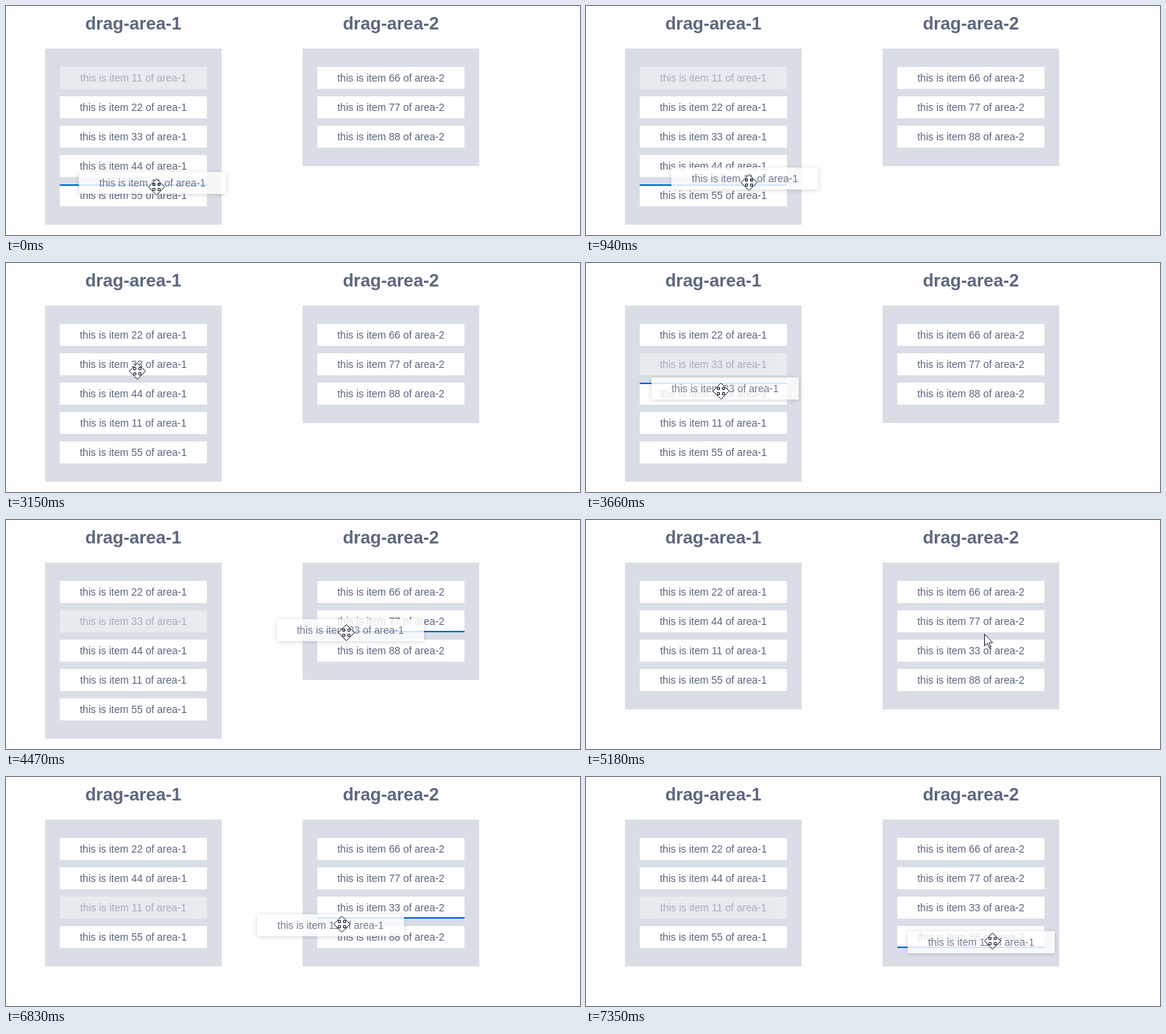
An HTML page that plays this animation: 780x312 px, repeating every 8000 ms.

```html
<!DOCTYPE html>
<html lang="en">
<head>
<meta charset="utf-8">
<title>Drag areas</title>
<style>
html, body { margin: 0; width: 100%; height: 100%; overflow: hidden; background: #fefefe; }
body { position: relative; color: #5c677f; font: 14px/30px Arial, "Liberation Sans", sans-serif; text-align: center; }
h1 { position: absolute; top: 10px; width: 240px; margin: 0; font: bold 24px/28px Arial, "Liberation Sans", sans-serif; }
.area { position: absolute; top: 58px; width: 240px; padding: 20px 0; background: #d9dde5; }
.item { width: 200px; height: 30px; margin: 5px 20px 10px; background: #fefefe; white-space: nowrap; }
.item:last-child { margin-bottom: 5px; }
.faded { opacity: .4; }
.above { box-shadow: inset 0 2px #0366d6; }
.below { box-shadow: inset 0 -2px #0366d6; }
.ghost { position: absolute; margin: 0; opacity: .83; box-shadow: 0 1px 6px rgba(0, 0, 0, .2); }
svg { position: absolute; left: 0; top: 0; width: 780px; height: 312px; fill: #fff; stroke: #1c2030; }
</style>
</head>
<body>
<script>
const LOOP = 8000, STEP = 135;
const AREA_X = [53, 403], FIRST_Y = 83, PITCH = 40;
const ARROW = 'M0 0V16L3.7 12.5 6.2 18 8.5 17 6.1 11.6H11Z';
const MOVE = 'M0-11L5-6V-5H2V-2H5V-5H6L11 0 6 5H5V2H2V5H5V6L0 11-5 6V5H-2V2H-5V5H-6L-11 0-6-5H-5V-2H-2V-5H-5V-6Z';

// press: where the item was grabbed; moves: start time, number of steps, destination
const scenes = [
  { press: [178, 103], moves: [[0, 1, 204, 246], [120, 3, 207, 268], [670, 3, 221, 240], [1810, 1, 221, 229]] },
  { moves: [[2370, 1, 221, 229], [2640, 2, 199, 158], [2910, 3, 167, 141]] },
  { press: [167, 141], moves: [[3420, 3, 191, 190], [3810, 1, 194, 193], [3960, 3, 405, 157],
    [4350, 2, 518, 149], [4620, 2, 538, 154], [4900, 1, 540, 155]] },
  { moves: [[5180, 1, 541, 155], [5330, 1, 537, 156], [5480, 1, 425, 167], [5630, 3, 198, 172], [6020, 2, 188, 176]] },
  { press: [217, 175], moves: [[6290, 1, 224, 177]] },
  { press: [188, 176], moves: [[6440, 2, 426, 193], [6710, 4, 546, 220], [7220, 2, 557, 226]] }
];

const lists = [[11, 22, 33, 44, 55], [66, 77, 88]];
const label = (id, area) => `this is item ${id} of area-${area + 1}`;

function hitTest(x, y) {
  const area = AREA_X.findIndex(left => x >= left && x <= left + 240);
  if (area < 0) return { outside: true };
  const row = Math.floor((y - FIRST_Y) / PITCH);
  const dy = y - FIRST_Y - row * PITCH;
  const hit = Math.abs(x - AREA_X[area] - 120) <= 100 && dy <= 30;
  return { area, row, id: hit ? lists[area][row] : undefined, side: dy < 15 ? 'above' : 'below' };
}

function pickUp([x, y]) {
  const { area, row, id } = hitTest(x, y);
  return { id, area, dx: x - AREA_X[area] - 20, dy: y - FIRST_Y - row * PITCH };
}

function drop(drag, target) {
  const source = lists[drag.area], dest = lists[target.area];
  source.splice(source.indexOf(drag.id), 1);
  dest.splice(dest.indexOf(target.id) + (target.side === 'below'), 0, drag.id);
}

function render(x, y, drag, target, over) {
  const columns = lists.map((list, area) => {
    const items = list.map(id => {
      const state = id === drag?.id ? 'faded' : id === target?.id ? target.side : '';
      return `<div class="item ${state}">${label(id, area)}</div>`;
    }).join('');
    const left = `left:${AREA_X[area]}px`;
    return `<h1 style="${left}">drag-area-${area + 1}</h1><div class="area" style="${left}">${items}</div>`;
  }).join('');
  const ghost = drag
    ? `<div class="item ghost" style="left:${x - drag.dx}px;top:${y - drag.dy}px">${label(drag.id, drag.area)}</div>`
    : '';
  const shape = drag || over.id ? MOVE : ARROW;
  return `${columns}${ghost}<svg><path transform="translate(${x + .5} ${y + .5})" d="${shape}"/></svg>`;
}

// Play the session once; each cursor step becomes one picture.
function record() {
  const steps = [];
  let x, y, drag, target;
  for (const { press, moves } of scenes) {
    if (!press && drag && target) drop(drag, target);
    drag = press && pickUp(press);
    target = null;
    for (const [start, count, toX, toY] of moves) {
      const fromX = x ?? toX, fromY = y ?? toY;
      for (let i = 1; i <= count; i++) {
        x = Math.round(fromX + (toX - fromX) * i / count);
        y = Math.round(fromY + (toY - fromY) * i / count);
        const over = hitTest(x, y);
        // The drop line stays on the last item passed and clears outside both areas.
        if (over.outside) target = null;
        else if (drag && over.id && over.id !== drag.id) target = over;
        steps.push({ time: start + (i - 1) * STEP, html: render(x, y, drag, target, over) });
      }
    }
  }
  return steps;
}

const steps = record();
let shown;
function tick() {
  const time = performance.now() % LOOP;
  const step = steps.findLast(s => s.time <= time);
  if (step !== shown) document.body.innerHTML = (shown = step).html;
  requestAnimationFrame(tick);
}
tick();
</script>
</body>
</html>
```
